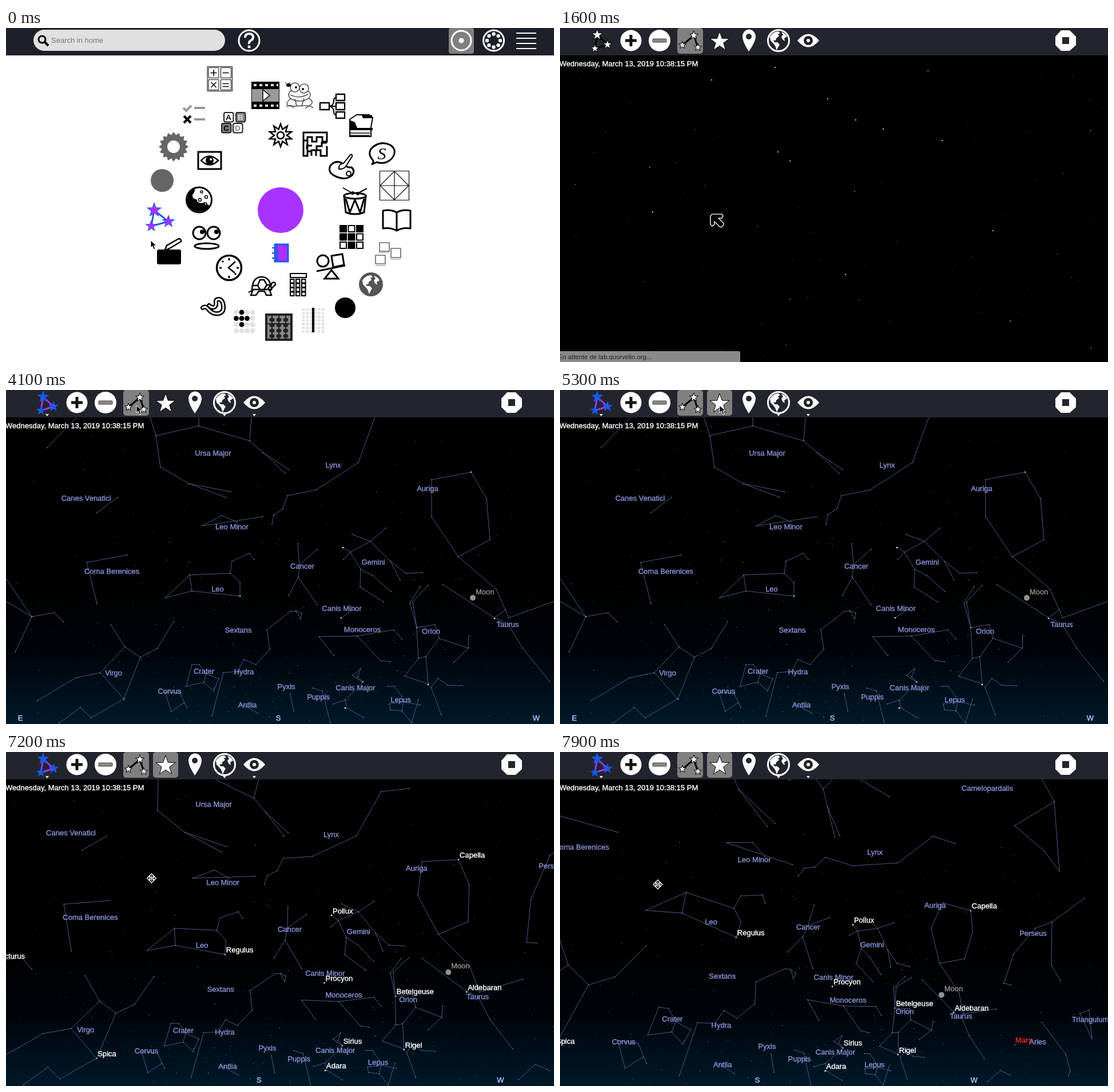
These frames come from a looping animation (958x585 px, 8000 ms). An HTML page with a canvas:

```html
<!DOCTYPE html>
<html lang="en">
<head>
<meta charset="utf-8">
<title>Night sky</title>
<style>
html,body{margin:0;width:100%;height:100%;overflow:hidden;background:#fff}
svg,canvas{position:absolute;left:0;top:0;width:958px;height:585px;display:block}
text{font-family:"Liberation Sans",Arial,sans-serif}
.ln{fill:none;stroke:#000;stroke-width:3}
.box{fill:#fff;stroke:#000;stroke-width:3}
.w{fill:#fff}
.hi{fill:#808080}
#chart text,#clock{font-size:13px;stroke-width:.4;fill:var(--ink);stroke:var(--ink)}
#chart path{fill:none;stroke:#485987}
#chart .mid{text-anchor:middle}
#chart .fig,#chart .name,#chart .air{display:none}
.lines #chart .fig,.names #chart .name,.ready #chart .air{display:inline}
#clock{--ink:#fff;font-size:13.25px}
.ready #early{display:none}
#bar .wire{stroke:#000}
#bar .mark{fill:#fff;stroke:#000}
.ready #tri .wire{stroke:#a832ff}
.ready #tri .mark{fill:#1a5ae8;stroke:#1a5ae8}
#carets{display:none}
.ready #carets{display:inline}
</style>
</head>
<body>
<svg id="home" viewBox="0 0 958 585">
  <defs>
    <path id="star" vector-effect="non-scaling-stroke" d="M0-10 2.4-3.2 9.5-3.1 3.8 1.2 5.9 8.1 0 4-5.9 8.1-3.8 1.2-9.5-3.1-2.4-3.2z"/>
    <path id="land" d="M-15-7Q-9-16 0-16L3-13-1-11 1-8-4-4-5 0-9-1-7 3-2 3 2 7-1 12-3 17-6 9-10 4-14 0zM5-15Q12-13 15-7L10-4 11 1 7-2 5-7 8-10z"/>
  </defs>
  <rect width="958" height="585" fill="#fff"/>
  <rect width="958" height="48" fill="#1d1f29"/>
  <rect x="48" y="3" width="335" height="37" rx="18.5" fill="#e0e0e0"/>
  <g class="ln"><circle cx="63" cy="20" r="6"/><path d="M67 24l7 7" stroke-width="4"/></g>
  <text x="79" y="26" font-size="13" fill="#777">Search in home</text>
  <g fill="none" stroke="#fff" stroke-width="3">
    <circle cx="425" cy="22" r="18"/>
    <path d="M418 17q0-7 7-7t7 6q0 4-4 6t-3 6" stroke-width="4"/>
    <rect x="774" y="0" width="44" height="45" rx="4" fill="#808080" stroke="none"/>
    <circle cx="796" cy="22" r="17"/>
    <circle cx="852.5" cy="22" r="18"/>
    <path d="M892 9h35m-35 9h35m-35 9h35m-35 9h35" stroke-width="2.2"/>
  </g>
  <g class="w"><circle cx="425" cy="33" r="2.5"/><circle cx="796" cy="22" r="4.5"/></g>

  <path class="ln" style="stroke-width:1" d="M352 67.5h43.5v43H352zM354 69.5h18v18h-18zm21.500 0h18v18h-18zM354 90.500h18v18h-18zm21.500 0h18v18h-18z"/>
  <path class="ln" style="stroke-width:1.600" d="M357.500 78.500h11m-5.500-5.500v11M378.500 78.500h11M358.500 95l9 9m0-9l-9 9M378.500 97.500h11m-11 5h11"/>
  <path d="M429 94h49v48h-49z"/><path fill="#999" d="M430 107h47v22h-47z"/>
  <path stroke="#ddd" stroke-width="4" stroke-dasharray="5 5" d="M433 100h43m-43 36h43"/>
  <path class="w" stroke="#000" stroke-width="1.500" d="M449 108v20l12-10z"/>
  <g fill="#fff" stroke="#555" stroke-width="1.600">
    <path d="M497 124q-11 10-1 13l34-1q11-6-1-13z"/><ellipse cx="513" cy="117" rx="19" ry="11"/>
    <circle cx="505" cy="104" r="8"/><circle cx="521" cy="106" r="8"/>
    <path fill="none" d="M497 117q15 8 31-1M505 124l3 12m13-13l-4 13m-27 2q8-6 13 2m34 0q-8-7-13 1"/>
  </g>
  <circle cx="507" cy="104" r="2"/><circle cx="519" cy="107" r="2"/><ellipse cx="494" cy="100" rx="4" ry="3"/><path class="ln" style="stroke-width:1" d="M488 95l5 5 4-5"/>
  <path class="ln" style="stroke-width:2" d="M565 137h12m-12 0q8-1 8-10 0-5 4-5m-12 15q8 1 8 10 0 5 4 5"/>
  <path class="box" style="stroke-width:2.300" d="M549 131h16v12h-16zM577 116h15v11h-15zm0 15h15v12h-15zm0 16h15v11h-15z"/>
  <path class="box" style="stroke-width:2" d="M601 160l12-8h22l6 5-3 17v16h-37z"/><path d="M600 161l10 4 4 10h27v4h-41zM622 153h18v5h-16z"/><path class="ln" style="stroke-width:1.500" d="M602 184h34m-34 4h34"/>
  <path class="box" d="M641 231q-11-13 1-23 14-11 30-3 13 9 3 23-11 12-27 7l-9 4q5-4 2-8z"/>
  <text x="657" y="230" text-anchor="middle" font-size="30" font-style="italic" style="font-family:'Liberation Serif',serif">S</text>
  <path class="ln" style="stroke-width:1.200" d="M653.500 250.500h51v51h-51zM679 250v52m-25-26h50M679 251l-25 25 25 25 25-25z"/>
  <path class="box" d="M591 294l3 29q16 6 32 0l3-29z"/><path class="ln" d="M594 299l7 24 9-22 9 22 7-24"/><ellipse class="box" cx="610" cy="294" rx="19" ry="5"/>
  <path class="ln" style="stroke-width:2" d="M589 280l16 9m26-8l-17 9"/><circle cx="606" cy="289" r="3"/><circle cx="615" cy="290" r="3"/>
  <path class="box" stroke-linejoin="round" d="M683 323q-11-6-24-3v31q14-2 24 4 10-6 24-4v-31q-13-3-24 3v32"/>
  <g fill="#fff" stroke="#666" stroke-width="1.600"><path d="M653 376h17v15h-17zm20 10h17v16h-17zm-27 12h17v15h-17z"/><path stroke="#aaa" d="M651 393h19m2 12h18m-44 11h18"/></g>
  <circle cx="638" cy="449" r="21" fill="#555"/><use href="#land" class="w" x="638" y="449"/>
  <circle cx="593" cy="490" r="18"/>
  <rect x="455" y="502" width="44" height="44" fill="#888" stroke="#222" stroke-width="4"/>
  <path class="ln" style="stroke-width:1.500" d="M465 503v42m12-42v42m12-42v42M455 518h44"/>
  <g fill="none" stroke-linecap="round"><path id="snake" stroke="#000" stroke-width="8" d="M344 490q5-4 10 3 8 9 18 7 9-2 8-13-1-11-8-12-6 0-5 5 1 7-3 9-4 2-9-3"/><path stroke="#fff" stroke-width="3" d="M344 490q5-4 10 3 8 9 18 7 9-2 8-13-1-11-8-12-6 0-5 5 1 7-3 9-4 2-9-3"/></g>
  <circle class="box" style="stroke-width:3.500" cx="390" cy="420" r="21.500"/>
  <path class="ln" d="M390 403v4m0 27v4m-17-18h4m26 0h4m-29-12l2 2m20 20l2 2"/><path class="ln" style="stroke-width:2.500" d="M401 409l-12 11 11 9"/>
  <g class="box" style="stroke-width:2.400"><path d="M432 458l-4 10h9l5-7h10l3 7h9l-4-11z"/><path d="M458 458q1-5 6-8 0-6 6-4 3 4-2 6l-6 8zM430 458q1-22 17-22 15 0 17 22zM430 460l-6 3"/><path fill="none" d="M430 451h10l4-10h7l5 9h6m-22 1l4 7m12-8l-5 8"/></g>
  <path class="box" style="stroke-width:2" d="M497 430h28v7h-28z"/>
  <circle class="box" cx="554" cy="408" r="10"/><path class="box" d="M569 399l19-3 3 19-19 4zM569 424l-12 15h24z"/><path class="ln" d="M543 426l50-10"/>
  <path class="box" d="M570 238q11-9 24 4 5 3 10 2 7 6 1 14-10 9-26 3-16-6-13-17 1-4 4-6z"/><circle class="box" style="stroke-width:2" cx="599" cy="255" r="4"/><path class="box" style="stroke-width:2" d="M582 247q-1-9 8-10l12-15q4-2 3 3l-10 16q-4 7-13 6z"/>
  <path class="ln" d="M520 183h41v16h-8v-8h-10v8h-8v-8h-8v33h-7zm0 14h7m7 27v-10h8v10m19-17v17h-11v-10h-7v-7h9v-6h9m-35 11v-6h9m-9 10h9"/>
  <path class="box" d="M336 217h40v30h-40z"/><path class="box" style="stroke-width:2.500" d="M341 232q14-15 30 0-15 15-30 0z"/><circle cx="356" cy="232" r="7"/><circle class="w" cx="358" cy="230" r="2"/>
  <path class="ln" style="stroke:#999;stroke-width:4" d="M310 140l5 5 9-9m5 4h19m-19 20h19"/><path class="ln" style="stroke-width:4" d="M311 154l12 12m0-12l-12 12"/>
  <g id="blocks" font-size="13" font-weight="bold" text-anchor="middle"></g>
  <circle class="box" cx="337.500" cy="301" r="22"/><path d="M330 280q-14 8-13 25 5 19 27 16 9-2 12-10-8-4-8-6-12 5-15-5-8-1-7-8 5-5 4-12z"/><g class="box" style="stroke-width:1.500"><circle cx="342" cy="287" r="2"/><circle cx="350" cy="296" r="2.500"/><circle cx="339" cy="301" r="2.500"/><circle cx="349" cy="308" r="2"/></g>
  <g class="box"><circle cx="338" cy="359" r="11"/><circle cx="363" cy="359" r="11"/><ellipse cx="351" cy="382" rx="21" ry="5"/></g><circle cx="343" cy="357" r="4"/><circle cx="368" cy="357" r="4"/>
  <rect x="264" y="388" width="42" height="26" rx="3"/><path class="box" style="stroke-width:2.500" d="M277 390l4-9 21-12q5 1 4 5l-20 12z"/>
  <path class="ln" style="stroke:#1a5ae8" d="M259 319l25 20-30 8z"/>
  <g fill="#a832ff" stroke="#1a5ae8"><use href="#star" transform="translate(259 319)scale(1.300)"/><use href="#star" transform="translate(284 339)scale(1.100)"/><use href="#star" transform="translate(254 347)"/></g>
  <circle cx="273" cy="267" r="20" fill="#666"/>
  <circle cx="480" cy="319" r="40" fill="#a832ff"/>
  <path fill="#a832ff" stroke="#1a5ae8" stroke-width="3" d="M470 379h23v30h-23z"/><path class="ln" style="stroke:#1a5ae8;stroke-width:2.500" d="M474 379v30m-9-24h7m-7 9h7m-7 9h7"/>
  <g id="made"></g>
</svg>

<div id="night">
  <canvas id="sky" width="958" height="585"></canvas>
  <!-- Star chart as seen from one heading; the script turns it. -->
  <svg id="chart" viewBox="0 0 958 585">
    <g class="fig" data-heading="0">
      <path d="M72 101 143 28M250 42 262 80 337 63 426 89 431 20M337 63 337 30M262 80 270 135 320 164 392 178M320 164 384 188M426 89 450 110 494 139M450 110 488 146"/>
      <path d="M159 215 195 188M448 222 343 238 377 220 404 231"/>
      <path d="M698 24 648 39 616 127 542 175 492 185 484 208 468 219 465 235"/>
      <path d="M791 292 744 222 744 157 813 144 840 190 846 262 791 292 857 349 873 385 854 399 764 341"/>
      <path d="M212 289 141 302 159 374"/>
      <path d="M325 352 321 324 279 364 325 352 409 361 409 337 392 321 395 300 425 286 434 297M321 324 392 321"/>
      <path d="M510 269 513 306 511 328 494 360M544 279 513 306M511 328 544 376"/>
      <path d="M605 253 637 265 664 242M637 265 602 284 590 276M590 297 602 284 620 314 619 345 660 371M620 314 641 325 673 353M689 333 672 300 637 265M672 300 699 321 728 320"/>
      <path d="M586 399 606 385M573 465 547 432 614 431 655 474 672 476M614 431 678 420 692 436"/>
      <path d="M507 387 517 391 515 401 507 387 497 388 456 420 461 454 437 481 416 472 405 493 380 495 360 571"/>
      <path d="M183 411 208 450 235 468 264 453 293 406M235 468 206 541 165 495 208 450M165 495 122 504 55 544M206 541 149 574 130 556 93 583"/>
      <path d="M-20 300 45 397 -30 352M16 459 45 397 84 390 100 406"/>
      <path d="M316 556 304 531 278 529 289 563 311 548M346 512 315 519 325 481 338 481 350 497 346 512 363 527 372 506 350 497"/>
      <path d="M411 550 440 566M497 532 503 562M536 522 553 527 567 583"/>
      <path d="M624 512 606 500 620 488 615 502 624 512 593 543 596 557 625 574M572 550 593 543"/>
      <path d="M667 519 679 519 692 537M724 552 695 546 670 550 672 560 692 562 709 583 721 542M695 546 692 562"/>
      <path d="M724 344 706 373 718 416 711 371 738 342M718 416 721 470 697 501 738 515 734 467 757 435 750 411 718 416M721 470 734 467M757 435 808 452 809 430M808 452 783 477"/>
      <path d="M761 569 743 521 755 505 772 517 798 518M873 385 879 399 964 368M854 399 877 409 903 452 950 510"/>
    </g>
    <g class="fig" data-heading="32.4">
      <path d="M835 34 864 87 873 209 847 174 795 129 864 87M500 33 575 78"/>
      <path d="M917 256 860 298 830 309 793 354 776 405 788 408M860 298 859 374 875 401"/>
      <path d="M842 473 884 529 892 559 889 567M909 458 925 452 930 502 909 458M748 577 770 558 787 566"/>
    </g>
    <g class="fig mid" style="--ink:#8791d6" transform="translate(0 -6.500)">
      <g data-heading="0">
        <text x="362" y="121">Ursa Major</text><text x="140" y="200">Canes Venatici</text><text x="395" y="250">Leo Minor</text>
        <text x="572" y="142">Lynx</text><text x="737" y="183">Auriga</text><text x="185" y="328">Coma Berenices</text>
        <text x="370" y="359">Leo</text><text x="518" y="319">Cancer</text><text x="642" y="312">Gemini</text>
        <text x="587" y="393">Canis Minor</text><text x="406" y="431">Sextans</text><text x="416" y="504">Hydra</text>
        <text x="188" y="506">Virgo</text><text x="286" y="538">Corvus</text><text x="346" y="503">Crater</text>
        <text x="422" y="562">Antlia</text><text x="490" y="530">Pyxis</text><text x="546" y="548">Puppis</text>
        <text x="611" y="532">Canis Major</text><text x="690" y="553">Lepus</text><text x="623" y="430">Monoceros</text>
        <text x="743" y="433">Orion</text><text x="877" y="421">Taurus</text>
      </g>
      <g data-heading="32.4">
        <text x="747" y="75">Camelopardalis</text><text x="827" y="329">Perseus</text><text x="835" y="519">Aries</text><text x="927" y="480">Triangulum</text>
      </g>
    </g>
    <g class="air" style="--ink:#929292" data-heading="0"><circle cx="816" cy="364" r="5" fill="#929292"/><g transform="translate(5 -6.500)"><text x="816" y="364">Moon</text></g></g>
    <g class="air mid" style="--ink:#b4c8ff" data-heading="0" transform="translate(-3 -6.500)"><text x="28" y="585">E</text><text x="479" y="585">S</text><text x="930" y="585">W</text></g>
    <g class="name" style="--ink:#e52b22" data-heading="32.4"><circle cx="795" cy="513" r="1.200" fill="#e52b22"/><g transform="translate(1 -3.500)"><text x="795" y="513">Mars</text></g></g>
    <g class="name" id="bright" style="--ink:#fff" data-heading="0" transform="translate(2 -3.500)">
      <text x="813" y="144">Capella</text><text x="589" y="276">Pollux</text><text x="409" y="361">Regulus</text><text x="45" y="397">Arcturus</text>
      <text x="586" y="399">Procyon</text><text x="718" y="416">Betelgeuse</text><text x="854" y="400">Aldebaran</text><text x="206" y="541">Spica</text>
      <text x="623" y="511">Sirius</text><text x="738" y="516">Rigel</text><text x="593" y="557">Adara</text>
    </g>
    <g id="early"><path style="stroke:#eee;stroke-width:2.200;stroke-linecap:round" d="M376 69h0M468 124h0M565 177h0M381 217h0M402 233h0M265 91h0M517 161h0M668 197h0M162 322h0M757 355h0M499 432h0"/></g>
    <text id="clock" x="-1" y="66.500">Wednesday, March 13, 2019 10:38:15 PM</text>
  </svg>
  <svg id="bar" viewBox="0 0 958 585">
    <rect width="958" height="48" fill="#22252d"/>
    <rect id="hiLines" class="hi" x="205" width="45" height="45" rx="5"/>
    <rect id="hiNames" class="hi" x="257" width="44" height="45" rx="5"/>
    <g id="tri"><path class="wire" fill="none" stroke-width="3" d="M65 12l18 17-22 7z"/><g class="mark"><use href="#star" transform="translate(65 12)"/><use href="#star" transform="translate(83 29)scale(.85)"/><use href="#star" transform="translate(61 36)scale(.75)"/></g></g>
    <circle class="w" cx="124" cy="22" r="18.500"/><path stroke="#111" stroke-width="5" d="M114 22h20m-10-10v20"/>
    <circle class="w" cx="174" cy="22" r="19"/><rect x="162" y="19" width="24" height="6" rx="1" fill="#888" stroke="#444"/>
    <path class="wire" fill="none" stroke-width="3" d="M214 30l20-17 7 21"/>
    <g class="mark"><use href="#star" transform="translate(234 13)scale(.8)"/><use href="#star" transform="translate(214 30)scale(.7)"/><use href="#star" transform="translate(241 34)scale(.7)"/><use href="#star" transform="translate(279 24)scale(1.800)"/></g>
    <path class="w" fill-rule="evenodd" d="M330 41q-11-17-11-26a11 12 0 0 1 23 0q0 9-12 26zM330 10a5 5 0 1 0 .1 0z"/>
    <circle cx="382" cy="22" r="18.500" fill="#22252d" stroke="#fff" stroke-width="3"/><use href="#land" class="w" x="382" y="22"/>
    <path class="w" d="M415 22q19-23 38 0-19 23-38 0z"/><circle cx="434" cy="22" r="8" fill="#222"/><circle class="w" cx="434" cy="22" r="3"/>
    <path id="carets" class="w" d="M69 42h6l-3 4zm310 0h6l-3 4zm52 0h6l-3 4z"/>
    <path class="w" d="M876 4h15l11 11v15l-11 10h-15l-10-10V15z"/><path fill="#22252d" d="M878 16h12v12h-12z"/>
  </svg>
</div>

<svg viewBox="0 0 958 585">
  <g id="status"><path fill="#8a8a8a" d="M0 566h312q3 0 3 3v16H0z"/><text x="-3" y="579.500" font-size="11.300" fill="#222">En attente de lab.quorvelin.org...</text></g>
  <path id="arrow" d="M0 0v13l3-3 2.500 6 2.500-1-2.500-6h4.500z" stroke="#fff"/>
  <path id="bigArrow" d="M3 0h17l2 3-2 4h-6l9 9v3l-4 4-3-1-9-9v5l-4 3-3-3V3z" stroke="#ddd" stroke-width="1.700" stroke-linejoin="round"/>
  <g id="mover"><path d="M0-8l4 4-2 2 2 0 0-2 4 4-4 4 0-2-2 0 2 2-4 4-4-4 2-2-2 0 0 2-4-4 4-4 0 2 2 0-2-2z" stroke="#fff" stroke-width="1.300"/><path d="M-5 0H5M0-5V5" stroke="#fff"/></g>
</svg>

<script>
const $ = id => document.getElementById(id);
const RAD = Math.PI / 180, LOOP = 8000;

let seed = 4711;
const rnd = () => (seed = seed * 16807 % 2147483647) / 2147483647;

// --- home icons made of repeated parts ---
const times = (n, part) => Array.from({length: n}, (_, i) => part(i));
const grid = (cols, rows, x, y, dx, dy, cell) =>
  times(cols * rows, i => cell(x + i % cols * dx, y + Math.floor(i / cols) * dy, i)).join('');
const dot = (x, y, r, fill) => `<circle cx="${x}" cy="${y}" r="${r}" fill="${fill}"/>`;
const square = (x, y, s, fill) =>
  `<rect x="${x}" y="${y}" width="${s}" height="${s}" fill="${fill}" stroke="#000" stroke-width="2"/>`;
const around = (x, y, r, a) => [x + r * Math.sin(a), y - r * Math.cos(a)];
const burst = (x, y, n, inner, outer, look) =>
  `<polygon points="${times(n * 2, i => around(x, y, i % 2 ? inner : outer, i * Math.PI / n)).join(' ')}" ${look}/>`;
const block = (c, x, y, fill, ink) =>
  `<rect x="${x}" y="${y}" width="16.5" height="16.5" rx="3" fill="${fill}" stroke="#222" stroke-width="2"/>` +
  `<text x="${x + 8}" y="${y + 13}" fill="${ink}">${c}</text>`;
$('made').innerHTML =
  times(8, i => dot(...around(852.5, 22, 11.5, i * Math.PI / 4), 3.2, '#fff')).join('') +
  burst(480, 188, 10, 11, 20, 'fill="#fff" stroke="#000" stroke-width="2.5"') +
  '<circle class="box" style="stroke-width:2.5" cx="480" cy="188" r="6"/>' +
  burst(293, 208, 16, 21, 26, 'fill="#666"') + dot(293, 208, 11, '#fff') +
  grid(4, 4, 402.5, 498, 9.5, 10.7, (x, y, i) => dot(x, y, 4.4, '.#..###..#'[i] === '#' ? '#000' : '#e2e2e2')) +
  grid(6, 7, 520, 493, 6.8, 6.4, (x, y) => dot(x, y, 2.5, '#e2e2e2')) +
  '<path class="ln" style="stroke-width:4" d="M537 490v43"/>' +
  grid(3, 4, 497, 440, 10, 7.5, (x, y) => square(x, y, 6.5, '#fff')) +
  grid(3, 3, 584, 346, 14.5, 14.5, (x, y, i) => square(x, y, 11, '#.###..#.'[i] === '#' ? '#000' : '#fff')) +
  grid(3, 4, 465, 511, 12, 9.5, (x, y) => `<ellipse cx="${x}" cy="${y}" rx="4.5" ry="3.5" fill="#222"/>`);
$('blocks').innerHTML = block('A', 381, 148, '#fff', '#000') + block('B', 402, 148, '#888', '#ddd') +
  block('C', 377, 167, '#777', '#000') + block('D', 397, 167, '#fff', '#888');

// --- sky: stereographic view, horizon at the bottom ---
const CX = 479, CY = 585, R = 451, AWAY = [-999, -999];

function place(x, y, heading) {
  const X = (x - CX) / R, Y = (CY - y) / R, q = X * X + Y * Y;
  const s = 2 * X / (1 + q), c = (1 - q) / (1 + q);
  return {az: Math.atan2(s, c) + heading * RAD, flat: Math.hypot(s, c), z: 2 * Y / (1 + q)};
}
function project(p, turn) {
  const a = p.az - turn * RAD, k = 1 + p.flat * Math.cos(a);
  return k < .08 ? null : [CX + R * p.flat * Math.sin(a) / k, CY - R * p.z / k];
}

const stars = [], paths = [], spots = [];
for (const group of document.querySelectorAll('[data-heading]')) {
  const heading = +group.dataset.heading;
  for (const el of group.querySelectorAll('path')) {
    const lines = el.getAttribute('d').split('M').slice(1).map(line =>
      line.match(/-?\d+ -?\d+/g).map(pair => place(...pair.split(' ').map(Number), heading)));
    paths.push({el, lines});
    lines.flat().forEach(p => stars.push({p, r: .75, a: .75}));
  }
  for (const el of group.querySelectorAll('text,circle')) {
    const keys = el.tagName === 'text' ? ['x', 'y'] : ['cx', 'cy'];
    const p = place(...keys.map(k => +el.getAttribute(k)), heading);
    spots.push({el, keys, p});
    if (group.id === 'bright') stars.push({p, r: 1.3, a: 1});
  }
}
times(800, () => {
  const z = rnd(), b = rnd() ** 3;
  stars.push({p: {az: (rnd() * 2 - 1) * Math.PI, z, flat: Math.sqrt(1 - z * z)}, r: .45 + b * .3, a: .16 + b * .4});
});
const early = times(170, () => {
  const b = rnd() ** 5;
  return {at: [958 * rnd(), 50 + 533 * rnd() ** .65], r: .55 + b * .4, a: .2 + b * .6};
});

function turnChart(turn) {
  for (const {el, keys, p} of spots) {
    const at = project(p, turn) || AWAY;
    keys.forEach((k, i) => el.setAttribute(k, at[i]));
  }
  for (const {el, lines} of paths)
    el.setAttribute('d', lines.map(line =>
      'M' + line.map(p => project(p, turn)).filter(Boolean).join(' ')).filter(d => d !== 'M').join(''));
}

const g = $('sky').getContext('2d');
const air = g.createLinearGradient(0, 48, 0, 585);
air.addColorStop(.55, '#000');
air.addColorStop(.78, '#00050b');
air.addColorStop(1, '#00192a');

function drawStars(ready, turn) {
  g.globalAlpha = 1;
  g.fillStyle = ready ? air : '#000';
  g.fillRect(0, 0, 958, 585);
  g.fillStyle = '#fff';
  for (const s of ready ? stars : early) {
    const at = s.at || project(s.p, turn);
    if (!at) continue;
    g.globalAlpha = s.a;
    g.beginPath();
    g.arc(...at, s.r, 0, 7);
    g.fill();
  }
}

// --- timeline: pointer stops as [time, x, y] ---
const stops = [[0, 253, 372], [900, 263, 326], [1900, 263, 326], [3200, 252, 65], [3500, 228, 27],
  [4500, 228, 27], [5200, 279, 27], [5500, 279, 27], [6900, 294, 214], [7500, 215, 228], [7900, 171, 232]];
const DRAG = 6950, SPEED = .0341;

function pointer(t) {
  const i = Math.max(1, stops.findIndex(s => s[0] >= t)), [t0, x0, y0] = stops[i - 1], [t1, x1, y1] = stops[i];
  const u = (t - t0) / (t1 - t0);
  return [x0 + (x1 - x0) * u, y0 + (y1 - y0) * u];
}
const show = (el, on) => el.style.display = on ? '' : 'none';

function render(t) {
  const open = t >= 1300, ready = t >= 1700, lines = t >= 3700, names = t >= 5400;
  const turn = Math.max(0, t - DRAG) * SPEED;
  const [x, y] = pointer(t);
  show($('home'), !open);
  show($('night'), open);
  show($('status'), t >= 1000 && !ready);
  show($('hiLines'), !ready || t >= 3600);
  show($('hiNames'), t >= 5300);
  $('night').className = [ready && 'ready', lines && 'lines', names && 'names'].filter(Boolean).join(' ');
  const kind = !open || y < 48 ? 'arrow' : ready ? 'mover' : 'bigArrow';
  for (const id of ['arrow', 'bigArrow', 'mover']) {
    show($(id), id === kind);
    $(id).setAttribute('transform', `translate(${x} ${y})`);
  }
  drawStars(ready, turn);
  turnChart(turn);
}

const start = performance.now();
let last = -1;
function tick() {
  const t = Math.floor((performance.now() - start) % LOOP / 100) * 100;
  if (t !== last) render(last = t);
  requestAnimationFrame(tick);
}
tick();
</script>
</body>
</html>
```
